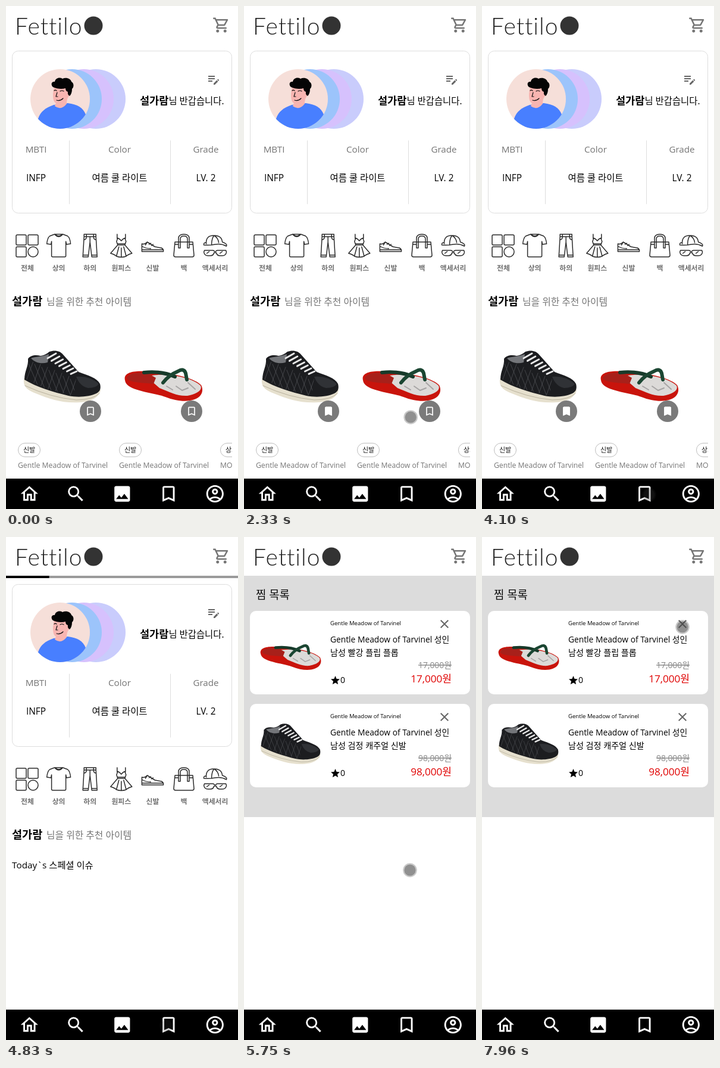
Write an HTML page that moves like this. It is 390x844 px and loops after 8000 ms.

```html
<!DOCTYPE html>
<html lang="ko">
<head>
<meta charset="utf-8">
<style>
html, body { margin: 0; height: 100%; overflow: hidden; background: #fff }
svg { display: block; width: 100%; height: 100% }
text { font-family: "Open Sans", "Noto Sans CJK KR", "Noto Sans CJK", sans-serif; white-space: pre }
.line { fill: none; stroke: #2b2b2b; stroke-width: 1.5; stroke-linejoin: round; stroke-linecap: round }
</style>
</head>
<body>
<svg id="stage" viewBox="0 0 390 844"></svg>
<script>
const LOOP = 8000;
const USER = '설가람', BRAND = 'Gentle Meadow of Tarvinel';

const ICON = {
  home: 'M12 5.69l5 4.5V18h-2v-6H9v6H7v-7.81l5-4.5M12 3L2 12h3v8h6v-6h2v6h6v-8h3L12 3z',
  search: 'M15.5 14h-.79l-.28-.27A6.47 6.47 0 0 0 16 9.5 6.5 6.5 0 1 0 9.5 16c1.61 0 3.09-.59 4.23-1.57l.27.28v.79l5 4.99L20.49 19l-4.99-5zm-6 0C7.01 14 5 11.99 5 9.5S7.01 5 9.5 5 14 7.01 14 9.5 11.99 14 9.5 14z',
  image: 'M21 19V5c0-1.1-.9-2-2-2H5c-1.1 0-2 .9-2 2v14c0 1.1.9 2 2 2h14c1.1 0 2-.9 2-2zM8.5 13.5l2.5 3.01L14.5 12l4.5 6H5l3.5-4.5z',
  mark: 'M17 3H7c-1.1 0-2 .9-2 2v16l7-3 7 3V5c0-1.1-.9-2-2-2zm0 15l-5-2.18L7 18V5h10v13z',
  marked: 'M17 3H7c-1.1 0-2 .9-2 2v16l7-3 7 3V5c0-1.1-.9-2-2-2z',
  account: 'M12 2C6.48 2 2 6.48 2 12s4.48 10 10 10 10-4.48 10-10S17.52 2 12 2zM7.35 18.5C8.66 17.56 10.26 17 12 17s3.34.56 4.65 1.5C15.34 19.44 13.74 20 12 20s-3.34-.56-4.65-1.5zm10.79-1.38C16.45 15.8 14.32 15 12 15s-4.45.8-6.14 2.12C4.7 15.73 4 13.95 4 12c0-4.42 3.58-8 8-8s8 3.58 8 8c0 1.95-.7 3.73-1.86 5.12zM12 6c-1.93 0-3.5 1.57-3.5 3.5S10.07 13 12 13s3.5-1.57 3.5-3.5S13.93 6 12 6zm0 5c-.83 0-1.5-.67-1.5-1.5S11.17 8 12 8s1.5.67 1.5 1.5S12.83 11 12 11z',
  cart: 'M15.55 13c.75 0 1.41-.41 1.75-1.03l3.58-6.49c.37-.66-.11-1.48-.87-1.48H5.21l-.94-2H1v2h2l3.6 7.59-1.35 2.44C4.52 15.37 5.48 17 7 17h12v-2H7l1.1-2h7.45zM6.16 6h12.15l-2.76 5H8.53L6.16 6zM7 18c-1.1 0-2 .9-2 2s.9 2 2 2 2-.9 2-2-.9-2-2-2zm10 0c-1.1 0-2 .9-2 2s.9 2 2 2 2-.9 2-2-.9-2-2-2z',
  close: 'M19 6.41L17.59 5 12 10.59 6.41 5 5 6.41 10.59 12 5 17.59 6.41 19 12 13.41 17.59 19 19 17.59 13.41 12z',
  edit: 'M3 10h11v2H3v-2zm0-2h11V6H3v2zm0 8h7v-2H3v2zm15.01-3.13.71-.71c.39-.39 1.02-.39 1.41 0l.71.71c.39.39.39 1.02 0 1.41l-.71.71-2.12-2.12zm-.71.71-5.3 5.3V21h2.12l5.3-5.3-2.12-2.12z',
  star: 'M12 17.27 18.18 21l-1.64-7.03L22 9.24l-7.19-.61L12 2 9.19 8.63 2 9.24l5.46 4.73L5.82 21z'
};

const $ = id => document.getElementById(id);
const text = (x, y, size, str, fill = '#000', more = '') =>
  `<text x="${x}" y="${y}" font-size="${size}" fill="${fill}" ${more}>${str}</text>`;
const mid = 'text-anchor="middle"', end = 'text-anchor="end"';
const icon = (name, cx, cy, size, fill, id = '') =>
  `<path ${id && `id="${id}"`} d="${ICON[name]}" fill="${fill}" transform="translate(${cx - size / 2} ${cy - size / 2}) scale(${size / 24})"/>`;
const path = (d, fill, more = '') => `<path d="${d}" fill="${fill}" ${more}/>`;
const stroke = (d, color, width) =>
  path(d, 'none', `stroke="${color}" stroke-width="${width}" stroke-linecap="round" stroke-linejoin="round"`);
const circle = (x, y, r, fill) => `<circle cx="${x}" cy="${y}" r="${r}" fill="${fill}"/>`;
const rect = (x, y, w, h, fill, more = '') =>
  `<rect x="${x}" y="${y}" width="${w}" height="${h}" fill="${fill}" ${more}/>`;

const header = text(15, 47.5, 39, 'Fettilo', '#222', 'style="font-family:Lato,sans-serif;font-weight:300;letter-spacing:1px"') +
  circle(147, 33, 15.5, '#333') + icon('cart', 362, 32, 30, '#757575');

const nav = rect(0, 793, 390, 51, '#000') +
  ['home', 'search', 'image', 'mark', 'account'].map((n, i) => icon(n, 39.3 + 78 * i, 818.5, 35, '#fff')).join('');

const avatar = circle(151, 156, 50, '#c9ccfc') + circle(131, 156, 50, '#d6c1fd') +
  circle(111, 156, 50, '#9cc4fb') + circle(91, 156, 50, '#f6dfd9') +
  `<g clip-path="url(#face)">` +
  path('M50 206L54 189C58 177 66 171 80 166L104 163C120 165 129 170 134 182L140 206Z', '#487fff') +
  path('M81 134L104 132C109 135 110 146 106 151Q102 155 102 164Q93 176 82 168L84 163C79 161 79 152 79 147Z', '#f8b5b1') +
  path('M79 136C75 132 76 126 82 127C83 121 90 119 95 122C101 119 109 122 110 127C115 130 114 137 111 139Q111 147 107 151Q103 149 104 144Q100 143 100 138C94 140 85 139 79 136Z', '#050505') +
  stroke('M81 142Q83 140 85 142M91 143Q94 141 97 143M86 145L84 152L87 152M85 158Q91 160 96 155', '#111', 1.2) + '</g>';

const column = (x, label, value) =>
  text(x, 246, 15.2, label, '#757575', mid) + text(x, 294, 15.4, value, '#000', mid);
const profile = rect(10.5, 75.5, 369, 272, '#fff', 'rx="10" stroke="#ddd"') + avatar +
  icon('edit', 349, 123, 24, '#666') +
  text(366.5, 165, 15.4, `<tspan font-weight="700" font-size="17.6">${USER}</tspan>님 반갑습니다.`, '#000', end) +
  column(50.5, 'MBTI', 'INFP') + column(191, 'Color', '여름 쿨 라이트') + column(336, 'Grade', 'LV. 2') +
  stroke('M106.5 226V332M276.5 226V332', '#ddd', 1);

// Outline drawings, each in a 40 by 40 box
const outlines = [
  ['전체', 'M3 2h13q2 0 2 2v13q0 2-2 2h-13q-2 0-2-2v-13q0-2 2-2zM23 2h13q2 0 2 2v13q0 2-2 2h-13q-2 0-2-2v-13q0-2 2-2zM3 22h13q2 0 2 2v13q0 2-2 2h-13q-2 0-2-2v-13q0-2 2-2zM21 30.5a8.5 8.5 0 1 0 17 0a8.5 8.5 0 1 0-17 0'],
  ['상의', 'M13 1L5 4Q1 7 0 17L7 18L8 13V37Q8 39 10 39H30Q32 39 32 37V13L33 18L40 17Q39 7 35 4L27 1Q20 9 13 1ZM13 1H27M15 2Q20 6 25 2'],
  ['하의', 'M10 1H30V5H10ZM10 5L8 39H17L20 14L23 39H32L30 5M20 5V14M10 10Q14 10 14 5M30 10Q26 10 26 5M8 36H17M23 36H32M14 1V5M26 1V5'],
  ['원피스', 'M13 1V7Q14 10 12 13L14 19L2 33Q9 35 12 38Q20 41 28 38Q31 35 38 33L26 19L28 13Q26 10 27 7V1M13 7Q17 8 20 12Q23 8 27 7M14 17H26M14 19H26M16 22L12 37M20 24V39M24 22L28 37'],
  ['신발', 'M2 17Q6 19 11 14L24 22L35 24Q39 26 38 30H2ZM2 27H38M11 14L8 19M14 18L17 16M18 20L21 18M2 21Q8 25 17 25'],
  ['백', 'M5 14H35L37 36Q37 39 34 39H6Q3 39 3 36ZM11 24V8Q11 1 20 1Q29 1 29 8V24M14 24V9Q14 4 20 4Q26 4 26 9V24M11 24H14M26 24H29M5 18H11M29 18H35'],
  ['액세서리', 'M5 17Q4 3 18 3Q31 3 32 14Q41 17 39 21Q30 16 20 18Q10 20 1 19Q0 15 5 15M18 3Q14 9 14 18M18 3Q25 7 26 15M2 28H16Q18 28 19 30H21Q22 28 24 28H38L39 31Q38 37 32 37H28Q23 37 22 32H18Q17 37 12 37H8Q2 37 1 31ZM6 33L10 30M28 33L32 30']
];
const categories = outlines.map(([label, d], i) => {
  const x = 36 + 52.6 * i;
  return `<path class="line" d="${d}" transform="translate(${x - 20} 382)"/>` +
    text(x, 443.5, 11.9, label, '#707070', mid + ' font-weight="700"');
}).join('');

const heading = text(10, 502, 18.6, USER, '#000', 'font-weight="700"') +
  text(68, 502, 15.8, '님을 위한 추천 아이템', '#757575');

let laces = '', quilt = '';
for (let i = 0; i < 7; i++) {
  laces += `M${70 + 6.5 * i} ${591 + 4.4 * i}L${84 + 5.8 * i} ${583 + 5 * i}`;
  quilt += `M${36 + 12 * i} ${596 + 5 * i}l18 ${42 + i}M${46 + 12 * i} ${596 + 5 * i}l-13 36`;
}
const sneaker =
  path('M30 625C29 638 33 643 50 650C75 660 95 667 125 665C143 664 156 657 159 645L156 636L40 622Z', '#e6e0ce') +
  stroke('M32 637Q75 657 118 661Q146 661 157 650', '#b9b29e', 1) +
  path('M31 627C31 612 38 605 37 592C41 586 50 585 58 587Q66 586 73 580C81 577 91 578 96 585L122 614C138 620 153 624 158 634C160 642 158 647 152 650C140 656 120 657 105 654C80 648 50 639 31 627Z', '#1c1d20') +
  path('M42 591C50 588 60 589 72 584L70 598C60 601 49 599 42 591Z', '#74767a') +
  `<g clip-path="url(#upper)">${stroke(quilt, '#55575b', .7)}</g>` +
  path('M118 622Q140 620 156 634Q152 641 138 641Q124 638 118 622Z', '#303236') +
  stroke(laces, '#e8e8e8', 3);

const sandal =
  path('M200 628C197 616 212 612 232 613L262 616C290 618 318 626 328 636C333 645 329 656 317 660C304 665 286 663 268 656C246 648 202 646 200 628Z', '#c9140c') +
  path('M236 622C262 614 312 622 327 637C331 645 320 651 305 654C288 655 276 648 258 641Z', '#dcdad8') +
  path('M203 624C207 616 222 614 236 615L252 624L248 634C228 632 206 632 203 624Z', '#a8201a') +
  stroke('M286 638L296 645L306 641M270 638L280 644M306 632L318 643', '#a7a5a5', 2) +
  stroke('M232 615Q262 612 284 622', '#173a2a', 6) +
  stroke('M264 632Q274 619 289 613Q299 607 302 616L304 627', '#1b4632', 6);

const chip = (x, label) => rect(x + .5, 733.5, 37, 23, '#fff', 'rx="11.5" stroke="#bdbdbd"') +
  text(x + 19, 748.5, 11, label, '#111', mid);
const product = (x, label, brand) => chip(x, label) + text(x, 775, 12.2, brand, '#757575');
const saveButton = (x, id) => circle(x, 680, 18, '#7a7a7a') +
  icon('mark', x, 680, 20, '#fff') + icon('marked', x, 680, 20, '#fff', id);
const products = `<g id="products" clip-path="url(#row)">` + sneaker + sandal +
  product(20, '신발', BRAND) + product(190, '신발', BRAND) + product(360, '상의', 'MORWIN') +
  saveButton(142, 'save1') + saveButton(312, 'save2') + '</g>';

const wish = (y, photo, line, price) => rect(10, y, 370, 140, '#fff', 'rx="10"') + photo +
  text(145, y + 24, 9.6, BRAND) + text(145, y + 53, 13.8, BRAND + ' 성인') + text(145, y + 75, 14.1, line) +
  icon('close', 337, y + 22, 24, '#666') + icon('star', 153.5, y + 116.5, 18, '#000') +
  text(162, y + 121, 14, '0') +
  text(349, y + 96, 13.9, price, '#888', end + ' text-decoration="line-through"') +
  text(349, y + 120, 17.1, price, '#e00000', end);
const place = (art, x, y, s) => `<g transform="translate(${x} ${y}) scale(${s})">${art}</g>`;
const list = rect(0, 65, 390, 405, '#dcdcdc') + text(20, 103.5, 18.8, '찜 목록', '#111') +
  wish(124, place(sandal, -128, -294, .78), '남성 빨강 플립 플롭', '17,000원') +
  wish(280, place(sneaker, 4.5, -138, .78), '남성 검정 캐주얼 신발', '98,000원');

stage.innerHTML = `<defs>
  <clipPath id="face"><circle cx="91" cy="156" r="50"/></clipPath>
  <clipPath id="row"><rect x="10" y="520" width="370" height="270"/></clipPath>
  <clipPath id="upper"><path d="M33 626L39 596L70 602L118 624L114 654L70 643Z"/></clipPath></defs>
  <g id="home">${profile + categories + heading + products}</g>
  <g id="loading">${text(10, 556, 15.3, 'Today`s 스페셜 이슈') + rect(0, 65, 390, 4, '#9a9a9a')}
    <rect id="bar" y="65" height="4"/></g>
  <g id="list">${list}</g>${header + nav}
  <g id="pointer">${circle(0, 0, 11.8, 'rgba(60,60,60,.28)') + circle(0, 0, 9.6, 'rgba(60,60,60,.4)')}</g>`;

// Pointer track: time, x, y, opacity
const track = [
  [470, 280, 820, .6], [1270, 139, 682, 1], [1340, 139, 680, .9], [1600, 139, 680, .9],
  [1860, 139, 680, .3], [2130, 140, 680, .8], [2330, 280, 690, 1], [2930, 320, 678, 1],
  [3000, 316, 677, .9], [3350, 315, 677, .3], [3620, 318, 680, .8], [4100, 281, 820, .5],
  [4360, 271, 820, .5], [4830, 270, 820, .4], [5030, 270, 820, .4], [5500, 269, 820, .6],
  [5750, 279, 559, 1], [6080, 279, 559, 1], [6220, 294, 317, 1], [6610, 294, 317, 1],
  [6820, 317, 222, 1], [7150, 317, 222, 1], [7890, 337, 151, 1], [LOOP, 337, 151, 1]
];
const easeOut = p => 1 - (1 - p) ** 3;
const show = (id, on) => $(id).style.display = on ? '' : 'none';

function movePointer(t) {
  show('pointer', t >= track[0][0]);
  const i = track.findIndex(k => k[0] > t);
  if (i < 1) return;
  const a = track[i - 1], b = track[i], p = (t - a[0]) / (b[0] - a[0]), e = easeOut(p);
  $('pointer').setAttribute('transform', `translate(${a[1] + (b[1] - a[1]) * e} ${a[2] + (b[2] - a[2]) * e})`);
  $('pointer').setAttribute('opacity', a[3] + (b[3] - a[3]) * p);
}

function draw(t) {
  const loading = t >= 4700 && t < 4960;
  show('home', t < 4960);
  show('products', t < 4700);
  show('loading', loading);
  show('list', t >= 4960);
  show('save1', t >= 1700);
  show('save2', t >= 3130);
  $('home').setAttribute('transform', `translate(0 ${loading ? 4 : 0})`);
  if (loading) $('bar').setAttribute('width', (t - 4700) * .554);
  movePointer(t);
}

const start = performance.now();
function tick() {
  draw((performance.now() - start) % LOOP);
  requestAnimationFrame(tick);
}
tick();
</script>
</body>
</html>
```
